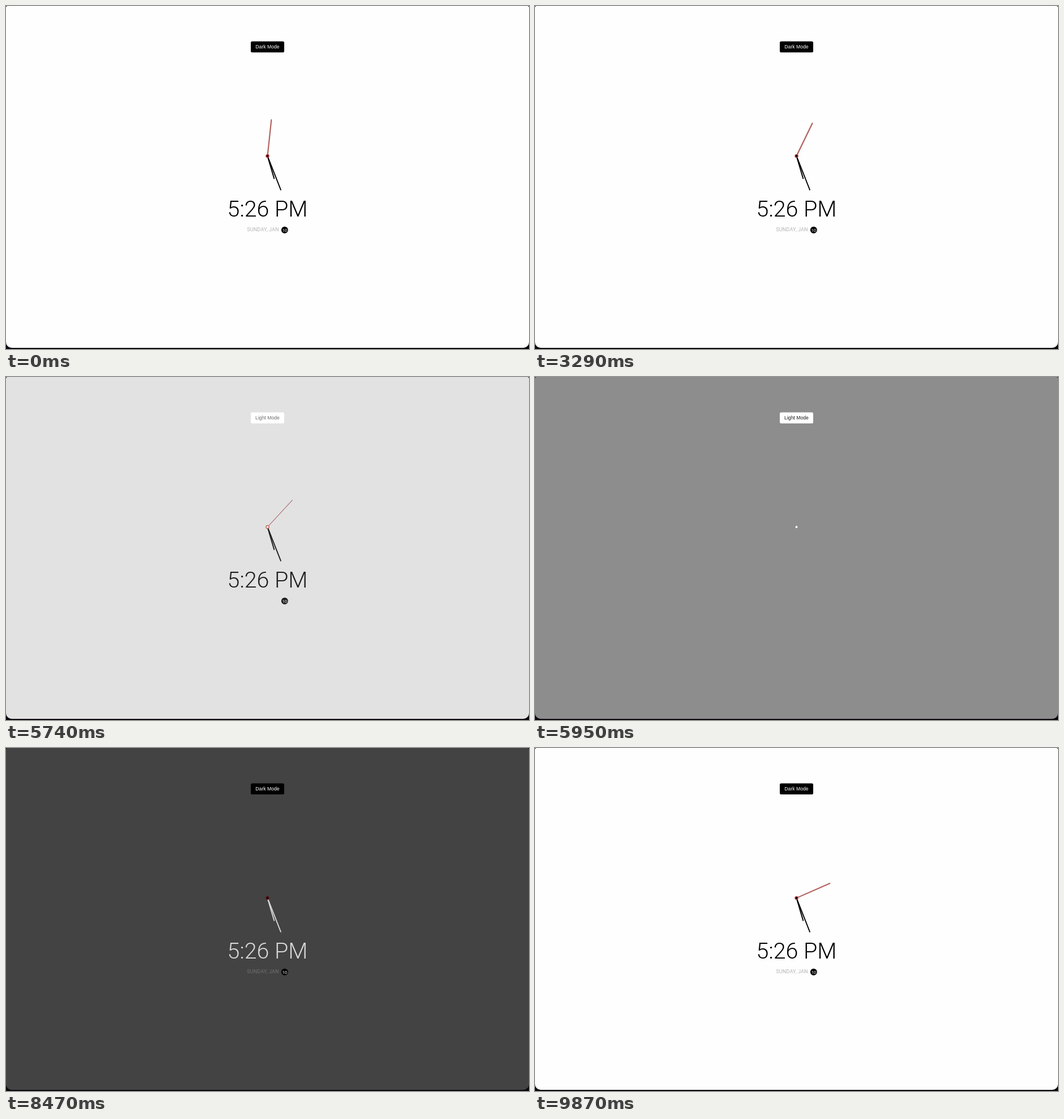
Animation of 923 by 606 pixels, one loop 9940 ms. Source, as an HTML page with a canvas:

```html
<!DOCTYPE html>
<html lang="en">
<head>
<meta charset="utf-8">
<title>Theme clock</title>
<style>
  html, body { margin: 0; width: 100%; height: 100%; overflow: hidden; background: #0b070d; }
  canvas { display: block; }
</style>
</head>
<body>
<canvas id="stage" width="923" height="606"></canvas>
<script>
const ctx = document.getElementById('stage').getContext('2d');
const W = 923, CX = 461.5, CY = 265;
const LOOP = 9940, TICK = 70;
const STEPS = [46, 956, 2006, 3056, 4106, 5156, 6206, 7256, 8236, 9356];
const STEP_MS = 560, FADE_MS = 600, TO_DARK = 5570, TO_LIGHT = 8226;
const SANS = '"Liberation Sans", Arial, sans-serif';
const ROBOTO = 'Roboto, "Open Sans", sans-serif';

const clamp = v => Math.min(1, Math.max(0, v));
const mix = (a, b, p) => a + (b - a) * p;
const gray = v => { const n = Math.round(v); return `rgb(${n},${n},${n})`; };

// cubic-bezier(.42, 0, 1, 1)
function easeIn(x) {
  x = clamp(x);
  let lo = 0, hi = 1;
  for (let i = 0; i < 24; i++) {
    const s = (lo + hi) / 2, r = 1 - s;
    if (1.26 * r * r * s + 3 * r * s * s + s * s * s < x) lo = s; else hi = s;
  }
  return lo * lo * (3 - 2 * lo);
}

function text(str, x, y, font, color, align = 'center', spacing = 0) {
  ctx.font = font;
  ctx.fillStyle = color;
  ctx.textAlign = align;
  ctx.letterSpacing = spacing + 'px';
  ctx.fillText(str, x, y);
}

function disc(x, y, r, color) {
  ctx.fillStyle = color;
  ctx.beginPath();
  ctx.arc(x, y, r, 0, Math.PI * 2);
  ctx.fill();
}

function box(x, y, w, h, r) {
  ctx.beginPath();
  ctx.roundRect(x, y, w, h, r);
}

// shift moves the bar sideways from the hand's axis
function hand(deg, len, width, color, shift = 0) {
  ctx.save();
  ctx.translate(CX, CY);
  ctx.rotate(deg * Math.PI / 180);
  ctx.fillStyle = color;
  ctx.fillRect(shift - width / 2, -len, width, len);
  ctx.restore();
}

function secondHand(deg, style) {
  if (style === 'light') {
    hand(deg, 65, 3, 'rgba(225,120,110,.25)');
    hand(deg, 65, 1.9, '#ab5f5a');
  } else if (style === 'dark') {
    hand(deg, 65, 2, '#d3150a', 0.7);
    hand(deg, 65, 1.3, '#97837c', -0.7);
  } else if (style === 'thin') {
    hand(deg, 65, 0.9, '#9c4a4a');
  }
}

function theme(t) {
  if (t < TO_DARK) return { dark: false, p: 1 };
  if (t < TO_LIGHT) return { dark: true, p: easeIn((t - TO_DARK) / FADE_MS) };
  return { dark: false, p: easeIn((t - TO_LIGHT) / FADE_MS) };
}

function draw(t) {
  const { dark, p } = theme(t);
  const bg = dark ? mix(254, 14, p) : mix(14, 254, p);
  const ink = dark ? 255 * p : 255 * Math.pow(1 - p, 0.7);
  const inkColor = gray(ink);
  const inkShown = Math.abs(ink - bg) > 30;
  const late = clamp((p - 0.5) / 0.3);

  ctx.fillStyle = '#0b070d';
  ctx.fillRect(0, 0, W, 606);
  ctx.fillStyle = gray(bg);
  box(0, 0, W, 604, [3, 3, 10, 10]);
  ctx.fill();
  if (dark && late > 0) {
    ctx.strokeStyle = `rgba(70,70,70,${late})`;
    ctx.lineWidth = 1;
    box(0.5, -5, W - 1, 608.5, [0, 0, 10, 10]);
    ctx.stroke();
  }

  ctx.fillStyle = dark ? '#fff' : '#000';
  box(432, 62.5, 59, 19.5, 2.5);
  ctx.fill();
  const labelColor = dark ? `rgba(20,20,20,${clamp(0.5 + p)})` : '#fff';
  text(dark ? 'Light Mode' : 'Dark Mode', CX, 75.3, `8.67px ${SANS}`, labelColor);

  if (inkShown) {
    hand(163.6, 42.25, 1.95, inkColor);
    hand(158.6, 65, 1.95, inkColor);
    text('5:26 PM', CX, 371.5, `300 39.4px ${ROBOTO}`, inkColor);
  }

  const moved = STEPS.reduce((sum, s) => sum + easeIn((t - s) / STEP_MS), 1);
  let style = dark ? 'dark' : 'light';
  if (p < 0.02) style = dark ? 'light' : 'dark';
  else if (p < 0.55) style = dark && p < 0.3 ? 'thin' : 'none';
  secondHand(moved * 360 / 59, style);

  const ringShown = !dark || p < 0.3 || p > 0.55;
  if (ringShown) disc(CX, CY, 3.25, dark ? '#c2574f' : mix(0, 1, p) < 0.5 ? '#5a1517' : '#c0454c');
  disc(CX, CY, 1.95, dark ? '#fff' : '#160507');

  let dateAlpha = late;
  if (p < 0.02) dateAlpha = 1;
  else if (!dark && p < 0.3) dateAlpha = 0.4;
  if (dateAlpha > 0) {
    ctx.globalAlpha = dateAlpha;
    text('SUNDAY, JAN', 425.2, 398, `9.1px ${ROBOTO}`, dark ? '#aaa' : '#b4b4b4', 'left', 0.13);
    ctx.globalAlpha = 1;
  }

  if (!dark || inkShown) {
    disc(491.8, 395.8, 6, dark ? inkColor : '#000');
    const num = dark && p > 0.5 ? '#8c8c8c' : '#fff';
    text('10', 491.8, 398.5, `7.8px ${ROBOTO}`, num);
  }
}

const start = performance.now();
function frame() {
  const t = (performance.now() - start) % LOOP;
  draw(Math.floor(t / TICK) * TICK);
  requestAnimationFrame(frame);
}
frame();
</script>
</body>
</html>
```
